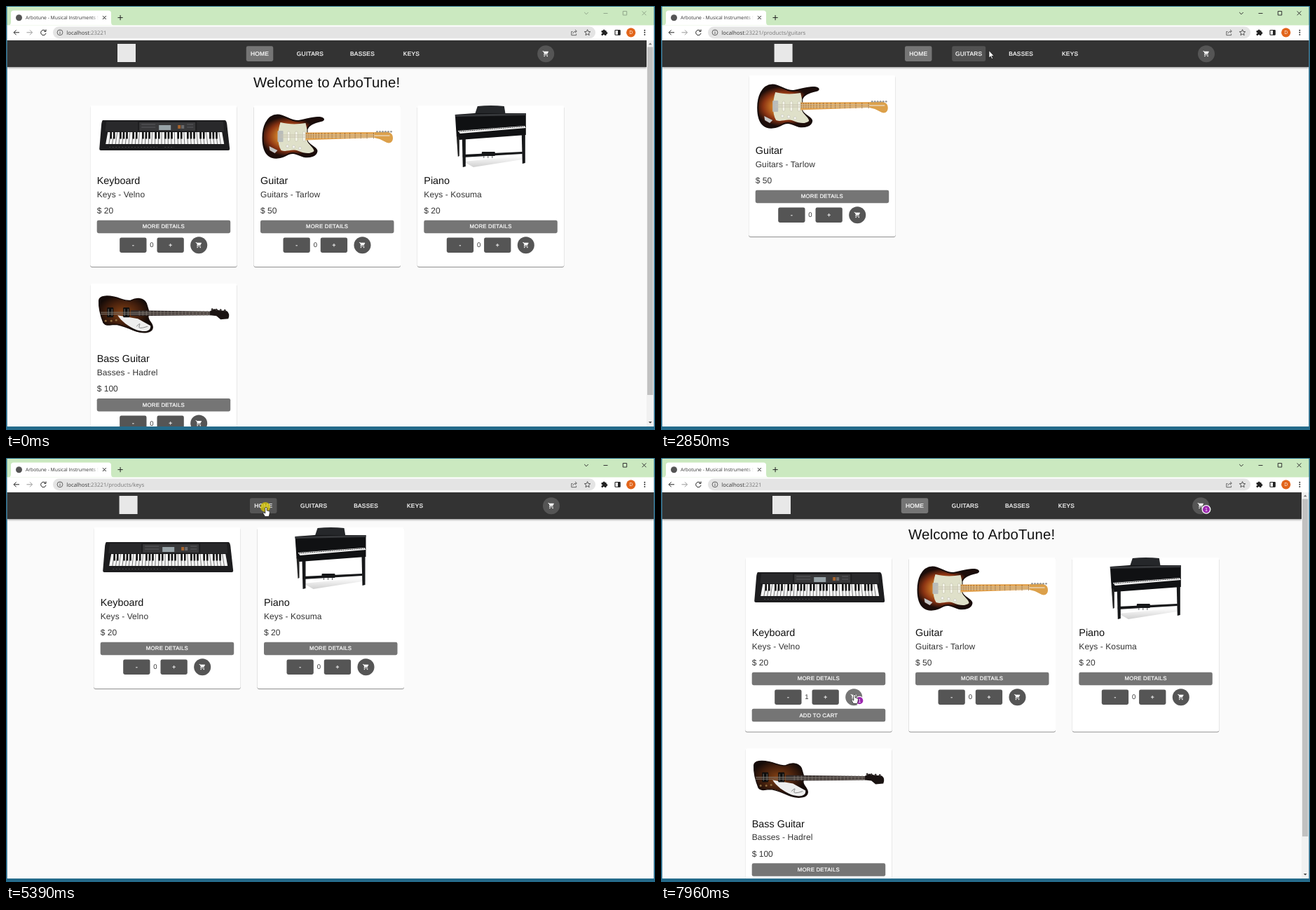
Animation of 926 by 605 pixels, one loop 8 s. Source, as an HTML page:

```html
<!DOCTYPE html>
<html lang="en">
<head>
<meta charset="utf-8">
<title>Arbotune</title>
<style>
html, body { margin: 0; width: 100%; height: 100%; overflow: hidden; background: #fafafa; }
svg { display: block; width: 926px; height: 605px; font-family: "Liberation Sans", Arial, sans-serif; text-rendering: geometricPrecision; }
.ui { font-family: "Open Sans", "Noto Sans", sans-serif; }
.btn { letter-spacing: .02857em; text-anchor: middle; fill: #fff; stroke: #fff; stroke-width: .22; }
.mid { text-anchor: middle; }
.card { fill: #fff; filter: drop-shadow(0 1px .5px rgba(0,0,0,.42)); }
.bar { fill: #333; filter: drop-shadow(0 1.4px 1.6px rgba(0,0,0,.45)); }
.line { fill: none; stroke-width: 1; }
</style>
</head>
<body>
<svg id="stage" viewBox="0 0 926 605">
<defs>
  <clipPath id="view"><rect x="1.5" y="49" width="923" height="551"/></clipPath>
  <clipPath id="tabClip"><rect x="27" y="8" width="105" height="17"/></clipPath>
  <linearGradient id="tabFade"><stop offset="0" stop-color="#fff" stop-opacity="0"/><stop offset="1" stop-color="#fff"/></linearGradient>
  <radialGradient id="burst" cx=".42" cy=".5" r=".6">
    <stop offset=".25" stop-color="#d98a2c"/><stop offset=".55" stop-color="#8c3413"/><stop offset=".78" stop-color="#1d0d0a"/>
  </radialGradient>
  <radialGradient id="brown" cx=".45" cy=".45" r=".55">
    <stop offset=".1" stop-color="#7a3c13"/><stop offset=".55" stop-color="#46200d"/><stop offset=".9" stop-color="#150b08"/>
  </radialGradient>
  <linearGradient id="floor" x1="0" y1="0" x2="0" y2="1"><stop offset="0" stop-color="#fff"/><stop offset="1" stop-color="#d0d0d0"/></linearGradient>
  <path id="cart" d="M7 18c-1.1 0-1.99.9-1.99 2S5.9 22 7 22s2-.9 2-2-.9-2-2-2zM1 2v2h2l3.6 7.59-1.35 2.45c-.16.28-.25.61-.25.96 0 1.1.9 2 2 2h12v-2H7.42c-.14 0-.25-.11-.25-.25l.03-.12.9-1.63h7.45c.75 0 1.41-.41 1.75-1.03l3.58-6.49c.08-.14.12-.31.12-.48 0-.55-.45-1-1-1H5.21l-.94-2H1zm16 16c-1.1 0-1.99.9-1.99 2s.89 2 1.99 2 2-.9 2-2-.9-2-2-2z"/>
  <g id="keyboard"></g>
  <g id="guitar"></g>
  <g id="piano"></g>
  <g id="bass"></g>
</defs>
<rect width="926" height="605" fill="#246a8a"/>
<g id="page" clip-path="url(#view)"></g>
<g id="chrome"></g>
<g id="pointer"></g>
</svg>
<script>
const LOOP = 8000;
const el = id => document.getElementById(id);
const clamp = v => Math.max(0, Math.min(1, v));
const ramp = (t, from, len) => clamp((t - from) / len);
const grey = v => `rgb(${[v, v, v].map(Math.round)})`;
const range = (n, f) => Array.from({ length: n }, (_, i) => f(i)).join('');

const rect = (x, y, w, h, fill, r = 0, extra = '') =>
  `<rect x="${x}" y="${y}" width="${w}" height="${h}" rx="${r}" fill="${fill}" ${extra}/>`;
const circle = (x, y, r, fill, extra = '') => `<circle cx="${x}" cy="${y}" r="${r}" fill="${fill}" ${extra}/>`;
const path = (d, fill, extra = '') => `<path d="${d}" fill="${fill}" ${extra}/>`;
const line = (d, stroke, extra = '') => `<path class="line" d="${d}" stroke="${stroke}" ${extra}/>`;
const text = (x, y, size, s, fill, extra = '') =>
  `<text x="${x}" y="${y}" font-size="${size}" fill="${fill}" ${extra}>${s}</text>`;
const label = (x, y, size, s) => `<text class="btn" x="${x}" y="${y}" font-size="${size}">${s}</text>`;
const group = (x, y, body, scale = 1) => `<g transform="translate(${x} ${y}) scale(${scale})">${body}</g>`;

// Product pictures, in card coordinates
el('keyboard').innerHTML =
  path('M18 21H192Q194 21 195 26L199 62Q199 64 197 64H15Q13 64 13 62L16 26Q17 21 18 21Z', '#1d1d1f') +
  path('M23 23H68V37H21Z', '#29292b') + path('M152 23H190L191 37H152Z', '#29292b') +
  rect(70, 24, 80, 12, '#38383a') + rect(98, 28, 17, 7, '#98a3a8') +
  rect(125, 28, 4, 5, '#a8642c') + rect(130, 28, 4, 5, '#6a6a6d') +
  line('M73 27H93M73 31H93M138 27H147M138 31H147', '#5a5a5e') +
  path('M25 38H188L191 55H22Z', '#f6f6f6') +
  range(35, i => line(`M${29.5 + i * 4.53} 38L${26.7 + i * 4.69} 55`, '#777', 'stroke-width=".5"')) +
  range(35, i => [2, 6].includes(i % 7) ? '' : rect(28.2 + i * 4.57, 38, 2.6, 9.5, '#111')) +
  line('M27 59.5H96M106 59.5H120', '#444', 'stroke-dasharray="2 2.5"');

el('guitar').innerHTML =
  path('M13 46C13 32 18 14 34 13.5C46 14 52 23 64 22C76 20 84 16 94 17C101 18 101 21 96 22C86 24 78 28 76 34V50C78 57 90 60 90 65C89 72 80 74 72 73C62 70 56 65 48 70C40 75 28 77 21 71C15 66 13 56 13 46Z', 'url(#burst)', 'stroke="#170c0a" stroke-width="2"') +
  path('M38 24C50 27 62 27 74 25L76 34V50C78 56 86 60 86 65C80 70 72 68 64 65C54 61 48 67 39 64C33 54 34 36 38 24Z', '#dfe0c9') +
  path('M74 38.5L172 38V46L74 49.5Z', '#e3a656') +
  range(18, i => { const x = 171 - 97 * (1 - Math.pow(.93, i)) / .72; return x < 75 ? '' : line(`M${x} 39V47`, '#a06a30', 'stroke-width=".5"'); }) +
  [48, 59, 70].map(x => rect(x, 37, 3.5, 14, '#f5f5ea', 1.5, 'stroke="#aaa890" stroke-width=".4"')).join('') +
  rect(34, 36, 8, 16, '#b9bcba', 1) + line('M38 42H172M38 45H172', '#c9c3b0', 'stroke-width=".5"') +
  [[48, 58], [57, 59], [66, 61]].map(([x, y]) => circle(x, y, 2, '#f6f6ee', 'stroke="#aaa" stroke-width=".4"')).join('') +
  path('M22 58L34 64L30 68L23 64Z', '#c5c5c5') +
  path('M172 38L180 38C188 37 196 37 198 43C200 50 196 55 190 53L180 48L172 46Z', '#dca04a') +
  range(6, i => circle(176 + i * 4, 37.3, 1.4, '#999')) + line('M172 43H194', '#eee', 'stroke-width=".6"');

el('piano').innerHTML =
  path('M66 80L146 72L156 76L80 88Z', 'url(#floor)') +
  path('M86 1Q105 -1 124 1L126 13H82Z', '#25272a') +
  path('M54 13L82 11H155V42L60 49L56 44Z', '#101113') +
  path('M54 13L155 11V14L54 16Z', '#35373a') +
  path('M58 36L153 29L155 32L61 40Z', '#f4f4f4') + line('M60 37L152 30', '#111', 'stroke-width="1.6" stroke-dasharray="1.4 1.2"') +
  path('M64 48L69 48V87L65 88Z', '#17181a') + path('M149 42L154 42V82L150 83Z', '#17181a') +
  path('M56 43L60 46V72L58 73Z', '#222') + path('M65 70L150 66V69L65 74Z', '#161719') +
  rect(92, 66, 19, 6, '#17181a', 1) + line('M95 72V75M101 72V75M107 72V75', '#55575a', 'stroke-width="2"');

el('bass').innerHTML =
  path('M12.5 24C13 17 24 17 34 19C44 21 50 26 58 24C66 20 76 20 80 28L83 38V45C80 52 90 56 89 63C88 70 76 71 66 68C54 64 46 58 34 58C26 59 22 60 19 56C15 46 12 34 12.5 24Z', 'url(#brown)', 'stroke="#170c09" stroke-width="1.4"') +
  path('M39 45L68 50L86 60C87 69 76 69 66 66C54 61 44 53 39 45Z', '#eee') +
  line('M66 61Q73 54 70 60T82 61', '#888', 'stroke-width=".6"') +
  path('M58 38L172 39.5V45L58 46Z', '#332b2a') +
  range(20, i => line(`M${70 + i * 5.1} 38.8V45.5`, '#706863', 'stroke-width=".5"')) +
  [24, 47].map(x => rect(x, 34, 9, 14, '#0d0d0d', 1) + line(`M${x + 2} 36V46M${x + 7} 36V46`, '#77706a', 'stroke-width=".7"')).join('') +
  line('M15 41H171M15 43.5H171', '#857d75', 'stroke-width=".4"') +
  [[22, 53], [30, 53], [37, 52]].map(([x, y]) => circle(x, y, 1.5, '#8b6a3e')).join('') +
  path('M171 39L177 36L184 38L195 39Q200 43 197 50L186 51L180 46L171 45Z', '#1a1312') +
  range(4, i => circle(174 + i * 6, 36.5 + i * .5, 1.5, '#3a3534'));

const products = {
  keyboard: ['Keyboard', 'Keys - Velno', 20],
  guitar: ['Guitar', 'Guitars - Tarlow', 50],
  piano: ['Piano', 'Keys - Kosuma', 20],
  bass: ['Bass Guitar', 'Basses - Hadrel', 100]
};

// [start, path, products]
const pages = [
  [0, '', ['keyboard', 'guitar', 'piano', 'bass']],
  [2730, '/products/guitars', ['guitar']],
  [3430, '/products/basses', ['bass']],
  [4400, '/products/keys', ['keyboard', 'piano']],
  [5540, '', ['keyboard', 'guitar', 'piano', 'bass']]
];
const nav = [['HOME', 362, 38.5], ['GUITARS', 434, 48], ['BASSES', 508.5, 45], ['KEYS', 578.5, 37]];
const hovers = {
  GUITARS: [1690, 2830], BASSES: [2960, 3510], KEYS: [3700, 4600], HOME: [4930, 5640],
  plus: [6690, 7300], cart: [7380, LOOP]
};
const hands = [[1690, 2830], [2960, 3510], [3700, 4600], [4930, 5900], [6690, 7300], [7370, LOOP]];
const clicks = [[2520, 438, 61], [3320, 514, 65], [4200, 583, 65], [5330, 370, 70], [6800, 243, 343], [7620, 275, 336]];
const track = [
  [110, 804, 563], [180, 700, 505], [250, 609, 449], [520, 609, 448], [850, 609, 448],
  [1620, 419, 68], [1830, 434, 64], [2240, 439, 62], [2740, 439, 62], [3000, 513, 66],
  [3450, 514, 66], [3650, 562, 70], [3790, 583, 66], [4540, 583, 66], [4970, 371, 70],
  [5880, 371, 70], [6560, 197, 353], [6720, 232, 346], [6850, 244, 344], [7260, 244, 344], [7480, 276, 337]
];
const COUNTED = 6950, BADGED = 6965, ADDED = 7720, FOCUSED = 2520;

const hover = (name, t) => {
  const [on, off] = hovers[name];
  return ramp(t, on, 220) - ramp(t, off, 250);
};
const cartButton = (x, y, v = 85) => circle(x, y, 12, grey(v)) +
  group(x - 5, y - 5, '<use href="#cart" fill="#fff"/>', 10 / 24);
const badge = (x, y, k) => k <= 0 ? '' :
  group(x, y, circle(0, 0, 6.4, '#fff') + circle(0, 0, 5.1, '#9c27b0') + text(0, 2.6, 7.2, 1, '#fff', 'class="mid"'), k);

function card(key, x, y, extra, t) {
  const [name, kind, price] = products[key];
  const active = key === 'keyboard' && t >= COUNTED;
  const lit = n => key === 'keyboard' ? 85 + 32 * hover(n, t) : 85;
  return group(x, y,
    `<rect class="card" width="209.5" height="${230 + extra}" rx="2.4"/>` +
    `<use href="#${key}"/>` +
    text(9.5, 112.3, 14.4, name, '#111') +
    text(9.5, 130.7, 12, kind, '#333', 'letter-spacing=".09"') +
    text(9.5, 154, 12, '$ ' + price, '#333') +
    rect(9.5, 163.7, 190.5, 18.5, '#757575', 2.4) + label(104.7, 175.4, 7.8, 'MORE DETAILS') +
    rect(42, 188.4, 38.3, 21.6, '#555', 2.4) + label(61.3, 201.7, 8.4, '-') +
    text(87.8, 202.4, 9.6, active ? 1 : 0, '#333', 'class="mid"') +
    rect(95.3, 188.4, 38.3, 21.6, grey(lit('plus')), 2.4) + label(114.6, 201.9, 8.4, '+') +
    cartButton(155, 199.2, lit('cart')) +
    (active ? badge(163, 204.2, ramp(t, BADGED, 200)) +
      rect(9.5, 215.8, 190.5, 18.5, '#757575', 2.4) + label(104.7, 227.5, 7.8, 'ADD TO CART') : ''));
}

function header(home, t) {
  const dx = home ? 0 : 5.2;
  return `<rect class="bar" x="1.5" y="49" width="${home ? 912.5 : 923}" height="38"/>` +
    rect(159 + dx / 2, 54, 26, 26, '#e8e8e8') +
    nav.map(([name, x, w]) => {
      const k = hover(name, t);
      const box = name === 'HOME' ? rect(x + dx - w / 2, 57.3, w, 21.7, grey(117 - 32 * k), 2.4)
        : rect(x + dx - w / 2, 57.3, w, 21.7, '#555', 2.4, `opacity="${k}"`);
      return box + label(x + dx, 71.3, 8.4, name);
    }).join('') +
    cartButton(home ? 770.2 : 778, 68.2) +
    badge(778, 73.3, ramp(t, ADDED, 200));
}

function scrollbar(bottom) {
  return rect(914, 49, 10.5, 551, '#f1f1f1') + rect(915, 58.5, 8.2, bottom - 58.5, '#c1c1c1') +
    path('M916.8 55.2L919.2 52.6L921.6 55.2Z', '#777') + path('M916.8 593L919.2 595.6L921.6 593Z', '#444');
}

function drawPage(page, t) {
  const home = page[1] === '';
  const extra = home && t >= COUNTED ? 18.4 : 0;
  const x0 = home ? 120.2 : 125.2, y0 = home ? 142 : 99;
  return rect(1.5, 49, 923, 551, '#fafafa') +
    (home ? text(457.6, 115.7, 20.4, 'Welcome to ArboTune!', '#111', 'class="mid" letter-spacing=".15"') : '') +
    page[2].map((key, i) => card(key, x0 + (i % 3) * 233.3, y0 + (i > 2 ? 254.2 + extra : 0), i < 3 ? extra : 0, t)).join('') +
    header(home, t) + (home ? scrollbar(extra ? 540 : 555) : '');
}

function drawChrome(url, focused) {
  const ink = '#222', ctl = focused ? '#333' : '#91a78b';
  return rect(1.5, 1, 923, 27, '#cbe9c0') +
    path('M3 27.5Q7 27.5 7 23V10Q7 6.5 11 6.5H146Q150 6.5 150 10V23Q150 27.5 154 27.5Z', '#fff') +
    circle(18.5, 16.8, 4.5, '#555') +
    `<g clip-path="url(#tabClip)">${text(28, 19.2, 6.8, 'Arbotune - Musical Instruments Store', '#333', 'class="ui"')}</g>` +
    rect(122, 10, 10, 14, 'url(#tabFade)') +
    line('M138 14.2L142.8 19M142.8 14.2L138 19M159.5 16.6H166.7M163.1 13V20.2', ink) +
    line('M825.2 9L828 11.8L830.8 9M852.5 10.5H858.5M880.3 7.5H885.7V13H880.3ZM907.6 7.4L913.4 13.2M913.4 7.4L907.6 13.2', ctl, 'stroke-width=".9"') +
    rect(1.5, 27.5, 923, 21.5, '#fff') + rect(67, 29.6, 774, 16.6, '#e4e4e4', 8.3) +
    line('M19 37.8H11.3M14.6 34.3L11.1 37.8L14.6 41.3', ink, 'stroke-width="1.2"') +
    line('M29.5 37.8H37.3M34 34.3L37.5 37.8L34 41.3', '#999') +
    line('M56.3 35.7A3.7 3.7 0 1 0 57 38.8M57 33.5V36.3H54.2', ink, 'stroke-width="1.2"') +
    circle(77, 37.8, 3.9, 'none', 'stroke="#555" stroke-width=".9"') + line('M77 37.2V40M77 35.4V36.3', '#555') +
    `<text class="ui" x="86.3" y="40.7" font-size="7.8" fill="#333">localhost<tspan fill="#777">:23221${url}</tspan></text>` +
    line('M808.5 36.5H806.8V41.7H813.6V39.6M808.8 39.3Q809.4 36.2 814 36M812 33.9L814.4 36L812 38.2', '#666', 'stroke-width=".8"') +
    line('M829.6 33.6L830.8 36.4L833.8 36.7L831.5 38.7L832.2 41.7L829.6 40.1L827 41.7L827.7 38.7L825.4 36.7L828.4 36.4Z', '#555', 'stroke-width=".8"') +
    rect(849.5, 35, 7.2, 7, ink, 1) + circle(853.2, 35, 1.5, ink) + circle(856.8, 38.4, 1.5, ink) +
    circle(849.8, 38.6, 1.1, '#fff') + circle(853, 41.9, 1.1, '#fff') +
    rect(869, 34.5, 7.2, 6.8, 'none', .6, `stroke="${ink}" stroke-width="1.1"`) + rect(873, 34.5, 3.3, 6.8, ink) +
    circle(891.7, 37.8, 6.6, '#e2651b') + text(891.7, 40.3, 6.8, 'D', '#fff', 'class="ui mid"') +
    [34.7, 37.8, 40.9].map(y => circle(911.3, y, .95, ink)).join('');
}

function position(t) {
  const i = track.findIndex(k => k[0] > t);
  if (i < 0) return track[track.length - 1].slice(1);
  const [a, x, y] = track[i - 1], [b, x2, y2] = track[i];
  const u = (t - a) / (b - a), k = u * u * (3 - 2 * u);
  return [x + (x2 - x) * k, y + (y2 - y) * k];
}

function drawPointer(t) {
  if (t < track[0][0]) return '';
  const marks = clicks.map(([at, x, y]) => {
    const age = t - at;
    if (age < 0 || age > 300) return '';
    return age < 150 ? circle(x, y, 7, '#d9c800', 'opacity=".75"')
      : circle(x, y, 5, '#555', `opacity="${.5 * (1 - ramp(age, 180, 120))}"`);
  }).join('');
  const hand = hands.some(([a, b]) => t >= a && t < b);
  const shape = hand
    ? 'M-1.2 .9Q0 -.6 1.2 .9V5L4 5.6Q5.6 6 5.4 8L4.8 11L4 13.5H-1.5L-4 9.2Q-4.8 7.6 -3.2 7.6L-1.2 9Z'
    : 'M0 0V10.5L2.4 8.3L4 12L5.6 11.3L4 7.7H7.3Z';
  return marks + group(...position(t), path(shape, '#fff', 'stroke="#111" stroke-width=".7" stroke-linejoin="round"'));
}

const cache = {};
function put(id, html) {
  if (cache[id] !== html) el(id).innerHTML = cache[id] = html;
}

function render(t) {
  const page = pages.filter(p => p[0] <= t).pop();
  put('page', drawPage(page, t));
  put('chrome', drawChrome(page[1], t >= FOCUSED));
  put('pointer', drawPointer(t));
}

const start = performance.now();
function tick() {
  render((performance.now() - start) % LOOP);
  requestAnimationFrame(tick);
}
tick();
</script>
</body>
</html>
```
